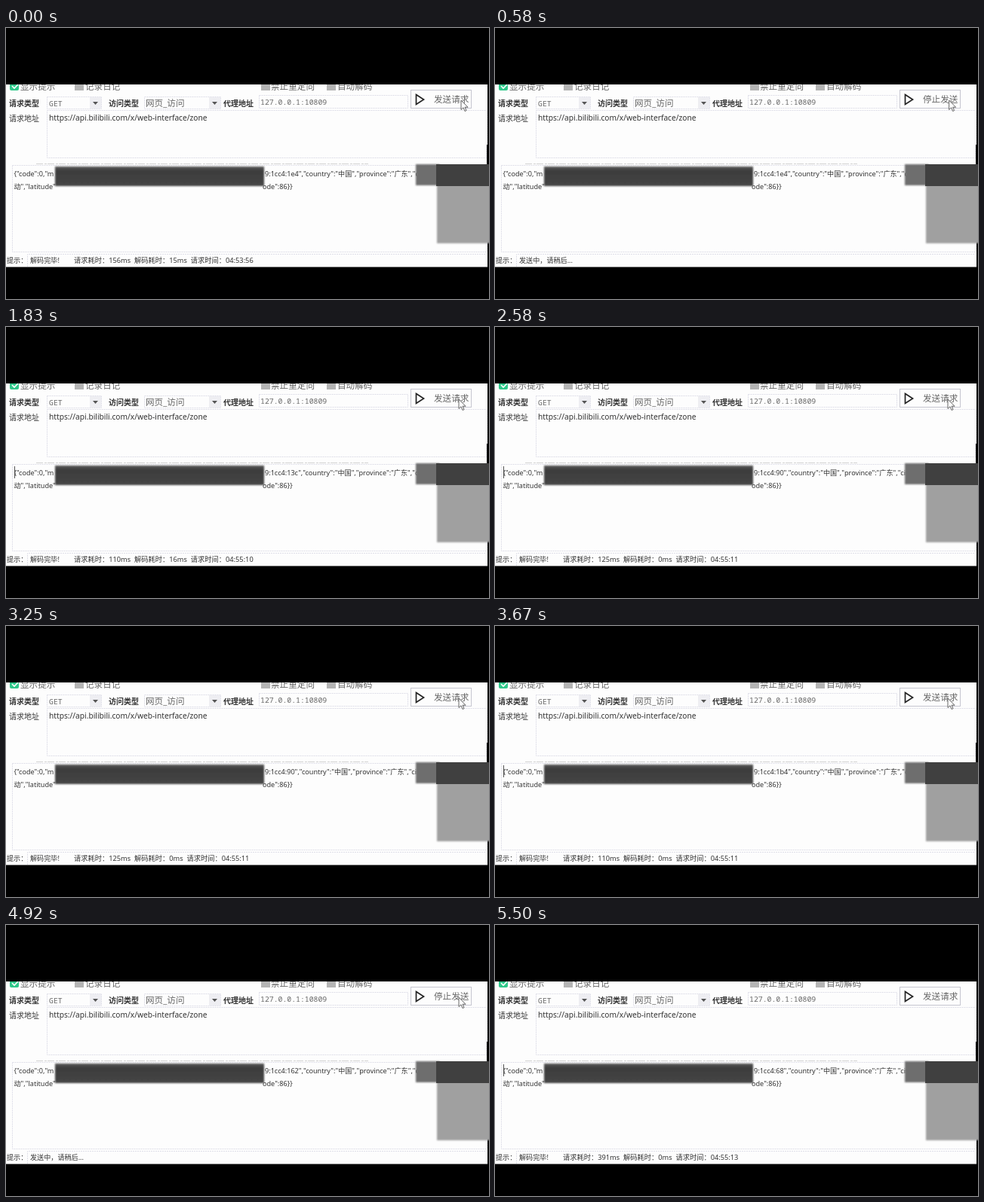
Recreate the animation shown at these times as an HTML page. Size 640 px wide and 360 px high, loop 5.58 s.

```html
<!DOCTYPE html>
<html lang="zh-CN">
<head>
<meta charset="utf-8">
<style>
html, body { margin: 0; width: 100%; height: 100%; overflow: hidden; background: #000; }
svg { display: block; width: 640px; height: 360px; }
text { font: 9.1px "Noto Sans", "Noto Sans CJK SC", "Noto Sans CJK", sans-serif; fill: #333; white-space: pre; }
.label { font-size: 10px; font-weight: 600; }
.big { font-size: 11.6px; fill: #666; }
.mono { font: 9.8px "Noto Sans Mono", monospace; fill: #666; }
.url { font-size: 10.2px; }
.timing { font-size: 9.25px; }
.box { fill: none; stroke: #dedee8; stroke-dasharray: 2 1; }
.drop { fill: #eeeef2; }
</style>
</head>
<body>
<svg viewBox="0 0 640 360">
  <defs>
    <filter id="soft" x="-5%" y="-20%" width="110%" height="140%"><feGaussianBlur stdDeviation="1.3"/></filter>
    <linearGradient id="bar" x2="0" y2="1">
      <stop stop-color="#5c5c5c"/><stop offset=".2" stop-color="#3c3c3c"/><stop offset="1" stop-color="#464646"/>
    </linearGradient>
  </defs>
  <path fill="#fdfdfd" d="M0 75H638V317.5H0Z"/>

  <!-- options row, cut off by the top band -->
  <rect x="5" y="71" width="12" height="12" rx="2" fill="#2fc88a"/>
  <path d="M8 77l3 3 5-5" fill="none" stroke="#fff" stroke-width="1.6"/>
  <path fill="#b4b4b4" d="M91 71h12v12h-12zM338 71h12v12h-12zM425 71h12v12h-12z"/>
  <text class="big" x="19" y="82">显示提示</text>
  <text class="big" x="105" y="82">记录日记</text>
  <text class="big" x="351" y="82">禁止重定向</text>
  <text class="big" x="439" y="82">自动解码</text>
  <path d="M0 60H640V75H0Z"/>

  <!-- request fields -->
  <path class="box" d="M54.5 91.5h72v16h-72zM183.5 91.5h101v16h-101zM335.5 89.5h197v17h-197zM54.5 109.5H637V172.5H54.5zM8.5 182.5H637V297.5H8.5zM28.5 317V300.5H637"/>
  <path class="drop" d="M111 92h15v15h-15zM269 92h15v15h-15z"/>
  <path fill="#555" d="M115 98h7l-3.5 4zM273 98h7l-3.5 4z"/>
  <path d="M40 180.5H480" stroke="#d2d2d2" stroke-dasharray="9 2 3 1"/>
  <text class="label" x="4" y="104">请求类型</text>
  <text class="label" x="136" y="104">访问类型</text>
  <text class="label" x="288" y="104">代理地址</text>
  <text x="4" y="124" style="font-size:10px">请求地址</text>
  <text class="mono" x="57" y="104">GET</text>
  <text class="big" x="185" y="104">网页_访问</text>
  <text class="mono" x="337" y="101.5">127.0.0.1:10809</text>
  <text class="url" x="57" y="123">https://api.bilibili.com/x/web-interface/zone</text>
  <rect x="536.5" y="82.5" width="80" height="24" fill="#fdfdfd" stroke="#c6c6d0"/>
  <path d="M543.5 88.5L553.5 95L543.5 101.5Z" fill="none" stroke="#222" stroke-width="1.7"/>
  <text class="big" id="action" x="567" y="98.5"></text>

  <!-- response -->
  <text x="10.5" y="197">{"code":0,"m</text>
  <text id="reply" x="343" y="197"></text>
  <text x="10.5" y="214">动","latitude"</text>
  <text x="340" y="214">ode":86}}</text>
  <path id="caret" d="M11.5 185V201" stroke="#555"/>
  <path d="M638 75h2v243h-2zM637 155h1v26h-1z"/>
  <rect x="65" y="184" width="277" height="26" fill="url(#bar)" filter="url(#soft)"/>
  <path fill="#a0a0a0" d="M571 208H643V286H571Z" filter="url(#soft)"/>
  <path fill="#6e6e6e" d="M543 181H575V209H543Z" filter="url(#soft)"/>
  <path fill="#404040" d="M570 181H640V210H570Z"/>

  <!-- status bar -->
  <text x="1" y="312">提示：</text>
  <text id="status" x="32" y="312"></text>
  <text id="timing" class="timing" x="90" y="312"></text>
  <path id="cursor" d="M0 0V12.5L3 9.8L5 14.5L7 13.6L5 9.2H9Z" fill="#fdfdfd" stroke="#555" stroke-width=".9"/>
</svg>
<script>
const LOOP = 5580, BLINK = 530;
// [sent at, answered at, address tail, request ms, decode ms, clock]
const calls = [
  [-300, -600, "1e4", 156, 15, "04:53:56"],
  [580, 700, "14b", 141, 15, "04:55:09"],
  [1670, 1790, "13c", 110, 16, "04:55:10"],
  [2420, 2540, "90", 125, 0, "04:55:11"],
  [3500, 3620, "1b4", 110, 0, "04:55:11"],
  [4170, 4300, "162", 125, 0, "04:55:12"],
  [4830, 5240, "68", 391, 0, "04:55:13"]
];
const $ = id => document.getElementById(id);
const put = (id, text) => { if ($(id).textContent !== text) $(id).textContent = text; };
const show = (id, on) => $(id).setAttribute("visibility", on ? "visible" : "hidden");

function draw(t) {
  const [, answered, tail, took, decode, clock] = calls.findLast(c => t >= c[1]);
  const sending = calls.some(c => t >= c[0] && t < c[1]);
  put("action", sending ? "停止发送" : "发送请求");
  put("reply", `9:1cc4:${tail}","country":"中国","province":"广东","city":"`);
  put("status", sending ? "发送中，请稍后..." : "解码完毕!");
  put("timing", `请求耗时：${took}ms\u00a0 解码耗时：${decode}ms\u00a0 请求时间：${clock}`);
  show("timing", !sending);
  show("caret", !sending && t - answered < BLINK);
  show("cursor", t < 5420);
  const x = 603 - Math.min(3, t / 420);
  $("cursor").setAttribute("transform", `translate(${x} 96)`);
}
function tick(now) {
  draw(now % LOOP);
  requestAnimationFrame(tick);
}
draw(0);
requestAnimationFrame(tick);
</script>
</body>
</html>
```
